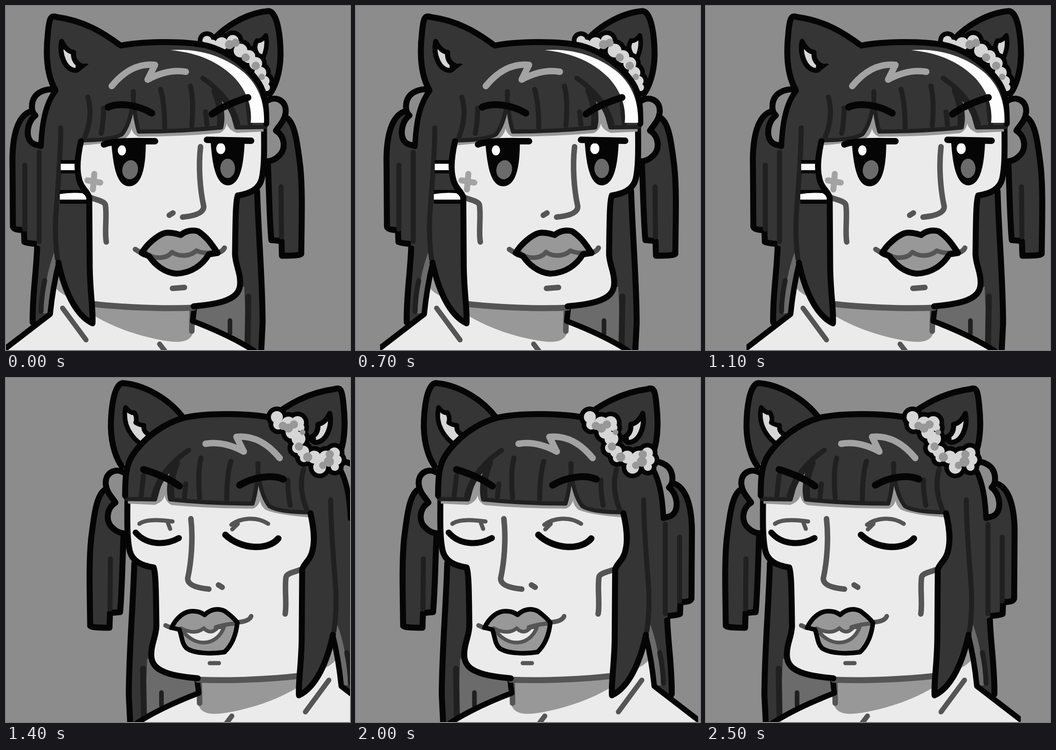
An HTML page that plays this animation: 748 by 748 pixels, repeating every 2700 ms.

```html
<!DOCTYPE html>
<html lang="en">
<head>
<meta charset="utf-8">
<title>Cat ears sway</title>
<style>
html, body { margin: 0; width: 100%; height: 100%; overflow: hidden; background: #8c8c8c; }
svg { display: block; width: 100vw; height: 100vh; }
path { stroke-linecap: round; stroke-linejoin: round; }
</style>
</head>
<body>
<svg id="stage" viewBox="0 0 748 748">
  <defs><clipPath id="sheet"><rect width="684.5" height="748"/></clipPath></defs>
  <g id="awake" clip-path="url(#sheet)"></g>
  <g id="asleep" clip-path="url(#sheet)"></g>
</svg>
<script>
const BLACK = '#050505', HAIR = '#353535', STRAND = '#202020', SKIN = '#ebebeb',
      SHADE = '#989898', LINE = '#555', BACK = '#6b6b6b', BG = '#8c8c8c',
      PETAL = '#d6d6d6', WHITE = '#fdfdfd', SHINE = '#a3a3a3';
const WIDTH = 685, INK = 13;

const shape = (d, fill, stroke = 'none', w = 0) =>
  `<path d="${d}" fill="${fill}" stroke="${stroke}" stroke-width="${w}"/>`;
const line = (d, color, w) => shape(d, 'none', color, w);
const lines = (list, color, w) => list.map(d => line(d, color, w)).join('');
const oval = (x, y, rx, ry, fill, turn = 0) =>
  `<ellipse cx="${x}" cy="${y}" rx="${rx}" ry="${ry}" fill="${fill}" transform="rotate(${turn} ${x} ${y})"/>`;
const dots = (list, fill, grow = 0) =>
  list.map(([x, y, r]) => oval(x, y, r + grow, r + grow, fill)).join('');
const blossom = (petals, shadows) =>
  dots(petals, BLACK, 10) + dots(petals, PETAL) + dots(shadows, SHADE);

const FRINGE = 'L163 292 Q230 292 252 279 Q273 252 277 198 Q280 245 289 273 ' +
  'Q380 273 468 264 Q476 230 458 188 Q490 218 497 250 L501 264 L564 263';
const CAP = 'C290 78 380 74 436 86 C485 99 527 133 550 168 C564 190 566 215 566 256';
const FACE_RIGHT = 'M561 258 C561 300 563 345 556 376 C550 399 530 408 504 412 ' +
  'C499 425 499 470 498 540 C499 562 509 578 509 598 C511 622 497 635 470 643 C450 649 430 651 408 653';

function backHair() {
  return shape('M608 242 C628 250 634 300 640 350 C645 400 643 460 642 539 Q640 543 600 543 ' +
      'L599 511 L577 509 C573 470 572 400 569 330', HAIR, BLACK, INK) +
    line('M598 393 L599 502', STRAND, 11) +
    shape('M568 206 C588 194 611 207 608 232 C606 250 592 262 587 271 C608 284 609 314 592 327 ' +
      'C584 335 574 338 564 338', BG, BLACK, INK) +
    shape('M58 228 C28 234 15 275 14 330 L15 480 Q18 488 39 487 L40 513 Q50 517 78 518 L84 260Z', HAIR, BLACK, INK) +
    line('M41 346 L41 485', STRAND, 11) +
    shape('M104 181 C78 180 60 192 57 212 C55 226 59 234 64 238 C48 250 44 275 50 289 ' +
      'C55 300 64 302 76 304 L105 230Z', BG, BLACK, INK) +
    shape('M490 395 L546 400 C549 500 558 600 558 690 L555 750 L490 750Z', HAIR) +
    shape('M400 640 L518 610 L524 750 L400 700Z', BACK) +
    line('M527 632 L525 750', STRAND, 13) +
    line('M487 684 L487 712', STRAND, 10) +
    line('M546 402 C549 500 558 600 558 690 L555 750', BLACK, INK);
}

function bodyAndFace() {
  return shape('M72 500 C66 570 58 630 58 690 L98 672 L114 556 L108 500Z', HAIR) +
    shape('M105 535 L114 556 L98 670 L80 668 Q84 590 105 535Z', BACK) +
    line('M84 597 Q77 630 76 664', STRAND, 11) +
    line('M68 520 C66 580 57 630 58 688', BLACK, INK) +
    shape('M-6 750 L98 670 L114 556 L200 600 L408 650 L406 685 L540 750Z', SKIN) +
    shape('M114 560 L107 612 Q120 628 145 636Z', SHADE) +
    shape('M186 645 L411 655 L408 704 C404 735 372 733 335 726 C285 716 235 700 186 670Z', SHADE) +
    lines(['M123 657 L174 726', 'M334 735 L347 752'], LINE, 11) +
    line('M115 558 C107 590 100 630 96 670 L-4 747', BLACK, 12) +
    line('M405 660 L404 707', LINE, 12) +
    line('M410 652 L406 685 C450 702 500 724 540 750', BLACK, 12) +
    shape('M163 200 L158 300 C155 330 155 350 158 370 C162 395 178 405 181 416 L184 648 ' +
      'Q300 662 408 653 L470 643 C497 635 511 622 509 598 C509 578 499 562 498 540 L500 412 ' +
      'C530 408 550 399 556 376 C563 345 561 300 561 200Z', SKIN) +
    line('M190 648 C250 655 340 659 408 656', LINE, 13) +
    line(FACE_RIGHT, BLACK, INK) +
    line('M186 417 C200 423 213 424 216 432 C220 455 214 490 218 513', LINE, 12) +
    shape('M163 200 L163 303 Q235 298 262 286 L288 284 Q380 284 470 276 L500 276 L560 273 L560 200Z', SHADE) +
    shape('M248 295 Q270 284 273 266 Q276 282 294 286Z', SKIN) +
    shape('M458 279 Q478 273 480 255 Q483 271 508 278Z', SKIN);
}

function ears() {
  return shape('M108 184 C88 150 86 105 91 60 C94 24 98 20 110 24 C170 32 212 58 249 86', HAIR, BLACK, INK) +
    shape('M121 77 C115 105 128 138 150 140 Q160 140 164 130 Q145 122 147 101 Q131 98 121 77Z', PETAL, BLACK, 11) +
    line('M156 132 L175 130', BLACK, 10) +
    shape('M440 86 C475 40 530 14 571 11 C590 13 597 65 597 107 C596 148 584 178 573 192', HAIR, BLACK, INK) +
    shape('M565 64 Q554 78 546 75 Q539 86 543 97 Q533 103 525 103 Q528 116 513 124 L508 156 ' +
      'C546 142 574 106 565 64Z', PETAL, BLACK, 10);
}

function frontHair(awake) {
  let out = shape('M108 184 C82 215 77 265 74 318 L67 520 L106 538 L114 556 C124 605 145 660 187 690 ' +
      'L181 415 C162 398 155 370 157 340 ' + FRINGE + ' L566 256 ' +
      'C566 215 564 190 550 168 C527 133 485 99 436 86 C380 74 290 78 250 86 L175 130Z', HAIR) +
    line('M163 292 ' + FRINGE, STRAND, 9) +
    lines(['M72 318 L72 512', 'M119 265 C119 330 112 400 108 460 Q106 510 112 550',
      'M178 198 Q190 240 171 286', 'M212 222 Q213 245 207 277', 'M277 186 L277 198',
      'M336 181 Q345 210 345 264', 'M401 174 Q409 205 404 260', 'M434 230 L437 258',
      'M428 157 Q490 200 504 256', 'M452 184 Q468 222 464 258', 'M526 212 L531 256'], STRAND, 11);
  if (awake) {
    out += shape('M119 335 H158 V364 H119Z', BLACK) + shape('M119 343 H150 V357 H119Z', WHITE) +
      shape('M117 400 H180 V430 H117Z', BLACK) + shape('M117 409 Q140 405 166 407 L176 415 V421 H117Z', WHITE);
  }
  out += line('M250 86 ' + CAP, BLACK, INK) +
    line('M108 184 C84 215 78 260 76 305', BLACK, 12) +
    line('M163 294 C156 325 153 350 158 372 C162 396 176 401 181 416 L182 560 C182 620 190 660 188 690 ' +
      'C150 672 126 615 114 558', BLACK, INK);
  if (awake) {
    out += shape('M358 96 C425 91 480 113 518 145 C550 174 563 212 561 254 L532 254 ' +
      'C536 218 523 184 496 155 C462 122 420 102 358 96Z', WHITE);
  }
  return out + line('M230 174 C256 142 288 124 324 128 L308 160 C332 147 362 138 391 143', SHINE, 14) +
    line('M222 220 C245 210 285 214 317 233', BLACK, 15) +
    line('M448 235 C470 219 500 207 526 199', BLACK, 15) +
    line('M423 306 C418 350 422 400 430 436 C430 452 405 457 384 459', LINE, 12) +
    line('M355 455 L363 450', LINE, 12);
}

function awakeFace() {
  const lips = 'M295 537 C308 515 335 494 350 493 C365 492 372 496 380 498 C390 489 405 486 418 490 ' +
    'C438 503 450 522 460 537 L441 540 C428 562 404 581 370 582 C345 580 324 563 311 544Z';
  return shape('M229 298 C233 340 238 392 268 392 C299 391 304 340 304 295Z', BLACK) +
    shape('M445 294 C448 340 455 390 483 390 C511 388 517 340 519 294Z', BLACK) +
    oval(270, 356, 17, 21, BACK, 12) + oval(482, 353, 16, 21, BACK) +
    oval(252, 314, 9, 11, WHITE) + oval(467, 310, 10, 12, WHITE) +
    lines(['M213 301 C235 292 280 294 324 294', 'M437 291 L533 293'], BLACK, 14) +
    lines(['M192 365 L189 399', 'M177 379 L205 384'], SHINE, 13) +
    lines(['M281 529 L300 541', 'M455 537 Q470 536 475 526'], LINE, 11) +
    shape(lips, SHADE) +
    line('M304 537 C322 552 350 550 361 535 C376 546 400 545 414 532 Q435 541 455 534', LINE, 10) +
    line(lips, BLACK, INK) +
    line('M362 614 L388 612', LINE, 12);
}

function asleepFace() {
  const lips = 'M220 543 C230 521 248 507 265 507 C280 507 286 511 292 515 C305 502 322 500 336 507 ' +
    'C348 516 358 525 363 532 C360 560 350 582 335 596 C310 600 268 600 252 587 C242 577 243 563 237 547Z';
  return lines(['M150 317 C165 306 195 308 222 312', 'M212 315 L217 328',
      'M350 319 C370 304 405 300 430 317', 'M352 329 L364 317'], LINE, 9) +
    line('M142 336 C165 363 205 365 236 348', BLACK, 13) +
    line('M337 341 C370 373 430 376 452 349', BLACK, 14) +
    lines(['M207 538 L218 543', 'M365 531 Q389 529 393 518'], LINE, 10) +
    shape(lips, SHADE) +
    shape('M240 544 Q271 560 290 544 Q305 560 321 542 L334 542 C318 584 268 588 240 544Z', SKIN, LINE, 8) +
    line('M316 542 Q338 535 358 534', LINE, 9) +
    line(lips, BLACK, 10) +
    line('M303 620 L323 620', LINE, 9);
}

const sideFlower = blossom(
  [[437, 75, 10], [448, 84, 11], [469, 82, 14], [493, 76, 13], [510, 97, 15], [528, 110, 14],
   [543, 125, 14], [553, 145, 13], [562, 163, 11], [566, 177, 8]],
  [[486, 84, 10], [499, 80, 9], [521, 112, 9], [543, 130, 9], [556, 154, 7]]);

const topFlower = blossom(
  [[449, 85, 13], [452, 101, 11], [474, 100, 16], [494, 97, 14], [501, 108, 8], [482, 118, 14],
   [496, 132, 15], [493, 152, 11], [506, 160, 13], [508, 174, 9], [530, 172, 14], [542, 194, 14],
   [556, 175, 17], [574, 163, 12], [579, 178, 11], [575, 193, 9]],
  [[462, 104, 9], [474, 109, 10], [486, 101, 9], [505, 118, 6], [497, 149, 9], [516, 172, 10],
   [549, 190, 8], [562, 182, 11], [564, 166, 9]]);

const girl = awake => backHair() + bodyAndFace() + ears() + (awake ? sideFlower : '') + frontHair(awake);

const awakeNode = document.getElementById('awake');
const asleepNode = document.getElementById('asleep');
awakeNode.innerHTML = girl(true) + awakeFace();
asleepNode.innerHTML = `<g transform="translate(${WIDTH} 0) scale(-1 1)">${girl(false)}</g>` +
  asleepFace() + topFlower;

const HALF = 13, LAST = 25, LOOP = 2700;
const ease = u => (1 - Math.cos(Math.PI * u)) / 2;

function draw(ms) {
  const step = Math.min(LAST, Math.floor((ms % LOOP) / 100));
  const awake = step < HALF;
  const x = awake ? 93.3 * ease(step / HALF)
                  : 142.2 - 143.4 * ease((step - HALF) / 12.75);
  awakeNode.style.display = awake ? '' : 'none';
  asleepNode.style.display = awake ? 'none' : '';
  (awake ? awakeNode : asleepNode).setAttribute('transform', `translate(${x.toFixed(2)} 0)`);
}

const start = performance.now();
function tick() {
  draw(performance.now() - start);
  requestAnimationFrame(tick);
}
tick();
</script>
</body>
</html>
```
